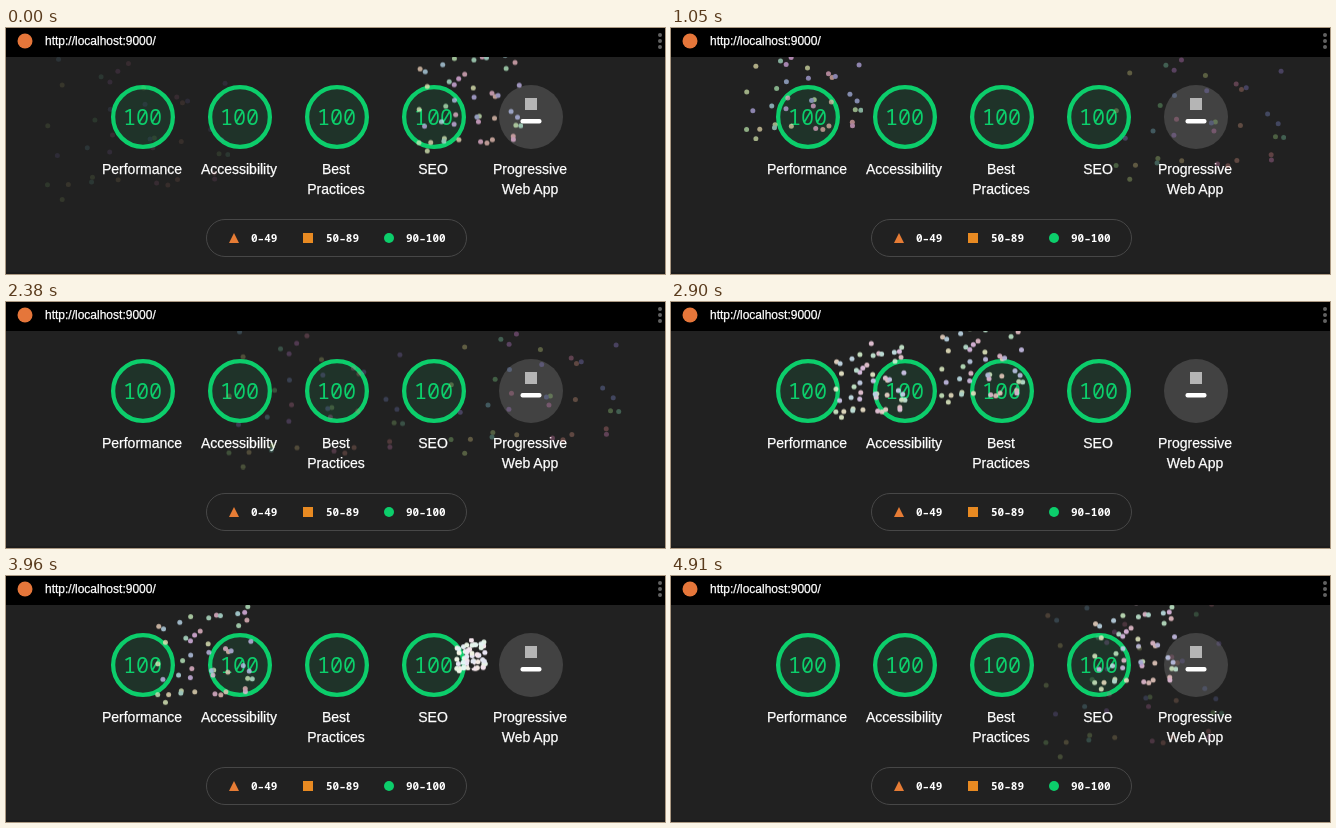
These frames come from a looping animation (659x246 px, 4.96 s). An HTML page:

```html
<!DOCTYPE html>
<html lang="en">
<head>
<meta charset="utf-8">
<title>Score fireworks</title>
<style>
  html, body { margin: 0; width: 100%; height: 100%; overflow: hidden; background: #212121; }
  #stage { position: absolute; left: 0; top: 0; width: 659px; height: 246px; overflow: hidden; background: #212121; }
  svg { position: absolute; left: 0; top: 0; display: block; }
  .spark { position: absolute; width: 5px; height: 5px; border-radius: 2.5px; }
  .label, .url { font: 14px "Liberation Sans", Arial, sans-serif; fill: #fff; stroke: #fff; stroke-width: .25px; }
  .url { font-size: 12px; }
  .score { font: 500 21.76px "Noto Sans Mono", monospace; fill: #0cce6b; }
  .label, .score { text-anchor: middle; }
  .range { font: 600 11px "Noto Sans Mono", monospace; fill: #fff; }
</style>
</head>
<body>
<div id="stage">
  <svg width="659" height="246">
    <g id="gauges"></g>
    <circle cx="525" cy="89" r="32" fill="#424242"/>
    <rect x="519" y="70" width="12" height="12" fill="#b5b5b5"/>
    <rect x="514.5" y="91" width="21" height="4.5" rx="2" fill="#fff"/>
    <rect x="200.5" y="191.5" width="260" height="37" rx="18.5" fill="none" stroke="#474747"/>
    <path d="M228 205l5 10h-10z" fill="#e67c35"/>
    <rect x="297" y="205" width="10" height="10" fill="#e88a22"/>
    <circle cx="383" cy="210" r="5" fill="#0cce6b"/>
    <text class="range" x="245" y="214">0–49</text>
    <text class="range" x="320" y="214">50–89</text>
    <text class="range" x="400" y="214">90–100</text>
    <rect y="244" width="659" height="2" fill="#1c1c1c"/>
  </svg>
  <div class="spark"></div>
  <div class="spark"></div>
  <svg width="659" height="29">
    <rect width="659" height="29" fill="#000"/>
    <circle cx="19" cy="13" r="7.5" fill="#e5763a"/>
    <text class="url" x="39" y="17">http://localhost:9000/</text>
    <g fill="#616161">
      <circle cx="654" cy="7" r="2"/><circle cx="654" cy="13" r="2"/><circle cx="654" cy="19" r="2"/>
    </g>
  </svg>
</div>
<script>
const LOOP = 4960;
const HOLD = 264.5;       // the picture advances in steps of this length
const LAST_CHANGE = 4910; // one short extra step closes the loop

// Burst places as [left %, top %] of the panel width.
const PLACES = [[47, 4], [30, 7], [70, 6], [20, 3], [80, 3]];
const PANEL = { x: -0.8, y: 46.7, width: 662 };

const LABELS = [["Performance"], ["Accessibility"], ["Best", "Practices"], ["SEO"], ["Progressive", "Web App"]];

document.getElementById("gauges").innerHTML = LABELS.map((lines, i) => {
  const x = 137 + 97 * i;
  const dial = i === LABELS.length - 1 ? "" :
    `<circle cx="${x}" cy="89" r="29.87" fill="#0cce6b" fill-opacity=".1" stroke="#0cce6b" stroke-width="4.27"/>
     <text class="score" x="${x - 0.5}" y="97">100</text>`;
  return dial + lines.map((line, n) =>
    `<text class="label" x="${x - 1}" y="${146 + 20 * n}">${line}</text>`).join("");
}).join("");

// Seeded generator, so that every load throws the same sparks.
let seed = 7;
const random = (from, to) => {
  seed = seed * 16807 % 2147483647;
  return from + (to - from) * seed / 2147483647;
};

const sparks = Array.from({ length: 50 }, () =>
  `${random(-94, 97)}px ${random(-163, 33)}px hsl(${random(0, 360)}, 50%, 64%)`);
const spread = sparks.join(", ");
const gathered = sparks.map(() => "0px 0px #fff").join(", ");

function makeEmitter(el, period, offset, firstPlace) {
  const paused = (frames, easing) => {
    const animation = el.animate(frames, { duration: period, easing, fill: "both" });
    animation.pause();
    return animation;
  };
  const animations = [
    paused([{ boxShadow: gathered }, { boxShadow: spread }], "ease-out"),
    paused([
      { transform: "translateY(0px)", opacity: 1 },
      { transform: "translateY(80px)", opacity: 0 }
    ], "ease-in")
  ];
  return time => {
    const age = time + offset;
    const [left, top] = PLACES[(firstPlace + Math.floor(age / period)) % PLACES.length];
    el.style.left = PANEL.x + PANEL.width * left / 100 + "px";
    el.style.top = PANEL.y + PANEL.width * top / 100 + "px";
    for (const animation of animations) animation.currentTime = age % period;
  };
}

const [quick, slow] = document.querySelectorAll(".spark");
const emitters = [makeEmitter(quick, 1000, 390, 2), makeEmitter(slow, 1250, 1154, 3)];

// The small lead keeps each change on or just before its 10 ms tick.
const heldTime = time =>
  time >= LAST_CHANGE ? LAST_CHANGE : HOLD * Math.floor((time + 10) / HOLD);

const start = performance.now();

function draw(now) {
  const held = heldTime(Math.max(0, now - start) % LOOP);
  emitters.forEach(show => show(held));
  requestAnimationFrame(draw);
}
draw(start);
</script>
</body>
</html>
```
